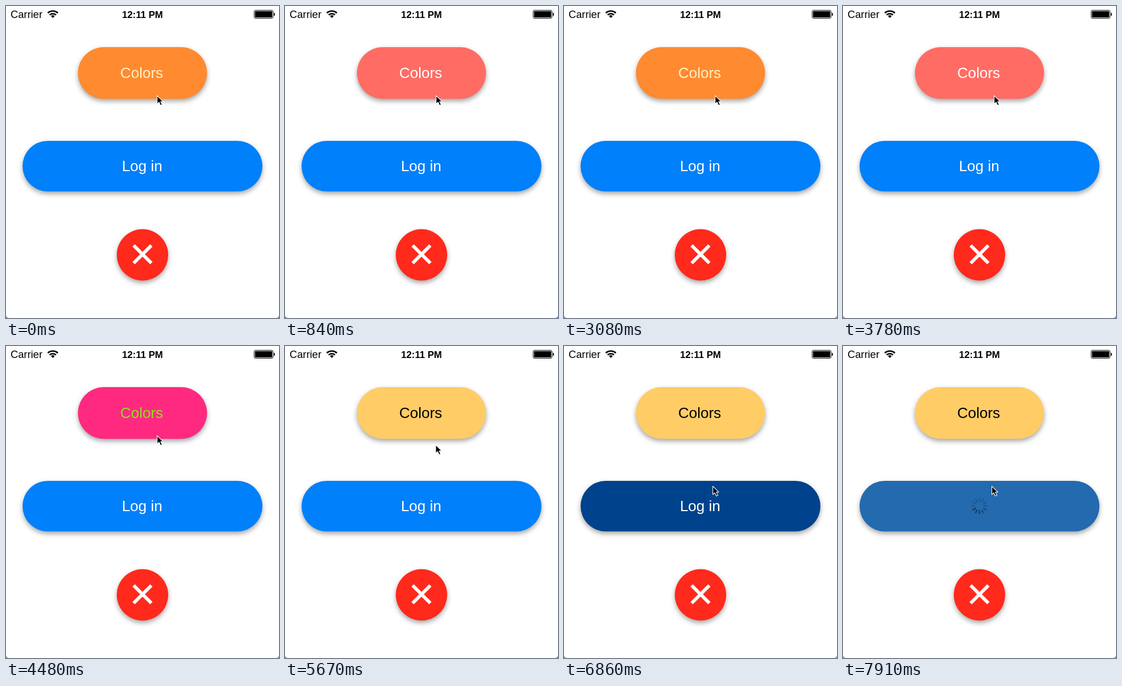
Write an HTML page that moves like this. It is 478 px wide and 546 px high and loops after 8000 ms.

```html
<!DOCTYPE html>
<html lang="en">
<head>
<meta charset="utf-8">
<title>Buttons</title>
<style>
  html, body { margin: 0; width: 100%; height: 100%; overflow: hidden; background: #fff; }
  svg { display: block; width: 478px; height: 546px; }
  text { font-family: "Liberation Sans", Arial, sans-serif; }
  .label { font-size: 26px; text-anchor: middle; }
  .raised { filter: drop-shadow(0 4px 4px rgba(0, 0, 0, .36)); }
</style>
</head>
<body>
<svg viewBox="0 0 478 546">
  <path d="M0 541V546H5A5 5 0 0 1 0 541ZM478 541V546H473A5 5 0 0 0 478 541Z" fill="#888"/>

  <text x="8" y="21" font-size="18.3">Carrier</text>
  <g fill="none" stroke="#000" stroke-width="2.6">
    <path d="M73.2 12.2A13 13 0 0 1 90.8 12.2"/>
    <path d="M76.4 15.6A8.4 8.4 0 0 1 87.6 15.6"/>
  </g>
  <path d="M82 21L78.7 17.6A4.8 4.8 0 0 1 85.3 17.6Z"/>
  <text x="239" y="21" font-size="16.7" font-weight="bold" text-anchor="middle">12:11 PM</text>
  <rect x="434.5" y="7.5" width="33" height="14" rx="2.5" fill="none" stroke="#000"/>
  <rect x="436" y="9" width="30" height="11" rx="1"/>
  <path d="M469 11.5Q471 12 471 14.5T469 17.5Z"/>

  <rect id="colors" class="raised" x="126" y="72" width="226" height="90.5" rx="45.2"/>
  <text id="colorsText" class="label" x="237.5" y="125.5">Colors</text>

  <rect id="login" class="raised" x="29" y="236" width="420" height="88.5" rx="44.2"/>
  <text id="loginText" class="label" x="238.3" y="288.8" fill="#fff">Log in</text>
  <g id="spinner" transform="translate(239 280)" stroke="#1c3553" stroke-width="2.7" stroke-linecap="round"></g>

  <circle class="raised" cx="239" cy="435.5" r="45" fill="#ff291c"/>
  <path d="M223.5 419L254.5 450M254.5 419L223.5 450" stroke="#fff" stroke-width="6"/>

  <path id="cursor" d="M0 0V14.6L3.4 11.5L6 17.2L8.8 16L6.2 10.5H10.6Z"
        fill="#000" stroke="#fff" stroke-width="1.1" stroke-linejoin="round"/>
</svg>
<script>
const LOOP = 8000, TICK = 70;
const $ = id => document.getElementById(id);

// Control states: [background, title]
const normal = [[255, 204, 102], [0, 0, 0]];
const highlighted = [[255, 138, 48], [255, 243, 200]];
const selected = [[255, 108, 100], [255, 255, 255]];
const selectedDown = [[255, 41, 128], [142, 225, 30]];

// [start, end, state]
const colorSteps = [
  [-1, 0, highlighted],
  [210, 350, selected],
  [1190, 1330, selectedDown],
  [1680, 1960, normal],
  [2730, 3080, highlighted],
  [3360, 3500, selected],
  [4410, 4480, selectedDown],
  [4830, 5110, normal]
];
const loginSteps = [
  [-1, 0, [[0, 128, 250], [255, 255, 255]]],
  [6790, 6860, [[0, 66, 140], [255, 255, 255]]],
  [6930, 7070, [[35, 106, 175], [35, 106, 175]]]
];

const clamp = x => Math.min(1, Math.max(0, x));
const progress = (t, a, b) => clamp((t - a) / (b - a));
const ease = p => p < .5 ? 4 * p ** 3 : 1 - 4 * (1 - p) ** 3;
const mix = (a, b, p) => a.map((v, i) => v + (b[i] - v) * p);
const rgb = c => `rgb(${c.map(Math.round)})`;

function paint(id, steps, t) {
  let [bg, title] = steps[0][2];
  for (const [a, b, state] of steps) {
    const p = progress(t, a, b);
    bg = mix(bg, state[0], p);
    title = mix(title, state[1], p);
  }
  $(id).setAttribute("fill", rgb(bg));
  $(id + "Text").setAttribute("fill", rgb(title));
}

const blades = Array.from({ length: 12 }, (_, i) => {
  const line = document.createElementNS("http://www.w3.org/2000/svg", "line");
  line.setAttribute("y1", -8.6);
  line.setAttribute("y2", -13.2);
  line.setAttribute("transform", `rotate(${i * 30})`);
  $("spinner").append(line);
  return line;
});

function render(time) {
  const t = Math.floor(time / TICK) * TICK;
  paint("colors", colorSteps, t);
  paint("login", loginSteps, t);

  const shown = progress(t, 6930, 7070);
  $("loginText").style.opacity = 1 - shown;
  $("spinner").style.opacity = shown;
  const head = 8 + Math.floor((t - 7910) * 12 / 1000);
  blades.forEach((blade, i) => {
    const age = ((head - i) % 12 + 12) % 12;
    blade.style.opacity = Math.max(.3, .95 - age * .11);
  });

  const m = ease(progress(t, 5200, 6510));
  $("cursor").setAttribute("transform", `translate(${264.6 - 4 * m} ${156.8 + 88.5 * m})`);
}

const start = performance.now();
function frame() {
  render((performance.now() - start) % LOOP);
  requestAnimationFrame(frame);
}
frame();
</script>
</body>
</html>
```
